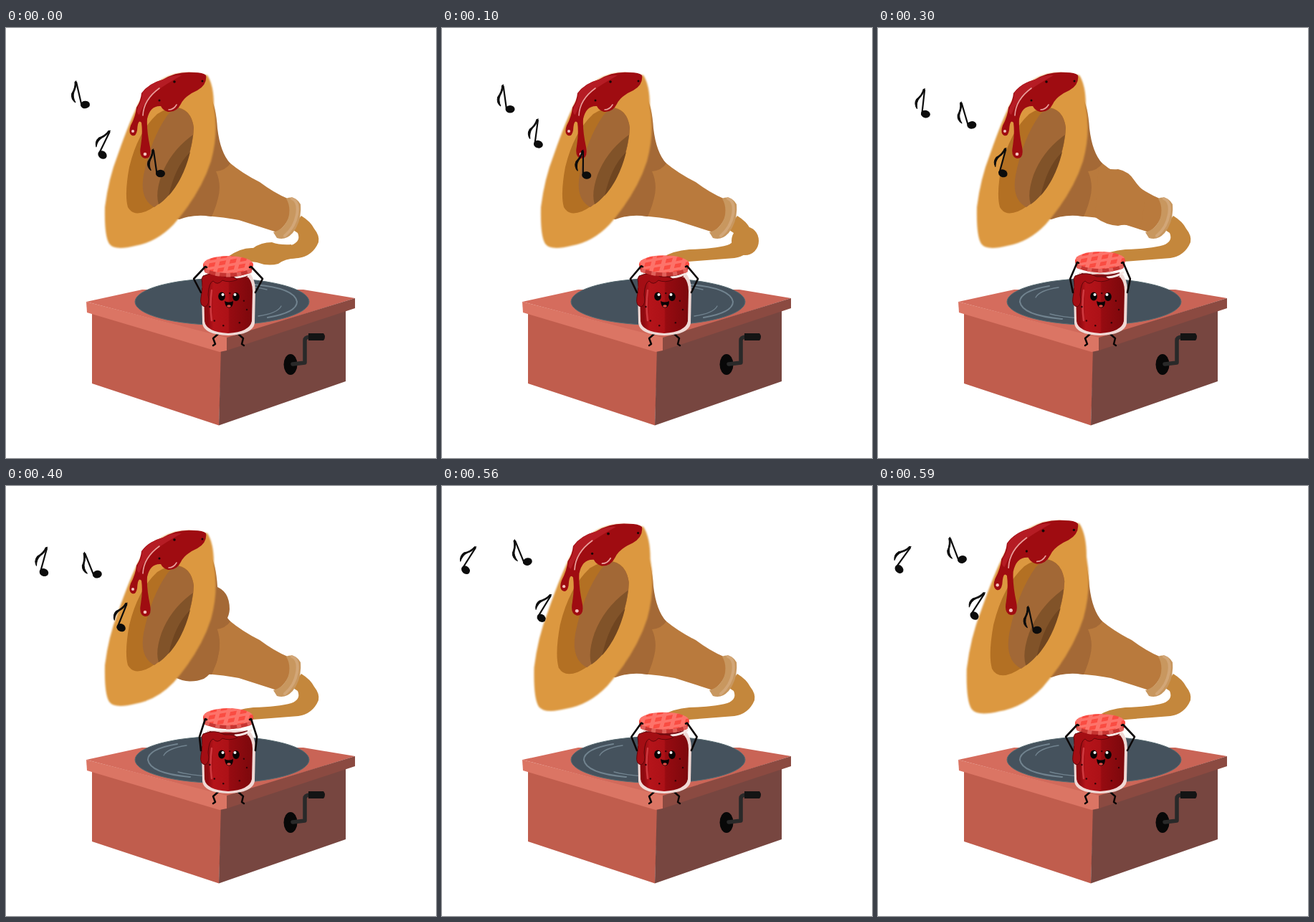
An HTML page for the animation above (690 ms loop, 600 by 600 pixels).

```html
<!DOCTYPE html>
<html lang="en">
<head>
<meta charset="utf-8">
<title>Jam gramophone</title>
<style>
  html, body { margin: 0; width: 100%; height: 100%; overflow: hidden; background: #fff; }
  svg { display: block; width: 100%; height: 100%; }
  .line { fill: none; stroke-linecap: round; stroke-linejoin: round; }
  .ink { stroke: #0b0606; }
  .shine { stroke: #e9a09c; }
</style>
</head>
<body>
<svg viewBox="0 0 600 600">
  <defs>
    <linearGradient id="topShade"><stop offset=".2" stop-color="#d56c5d"/><stop offset=".8" stop-color="#c96456"/></linearGradient>
    <linearGradient id="jarShade">
      <stop offset=".08" stop-color="#8f0a10"/><stop offset=".2" stop-color="#b5141a"/>
      <stop offset=".5" stop-color="#ad1117"/><stop offset=".53" stop-color="#970b11"/><stop offset="1" stop-color="#7c080c"/>
    </linearGradient>
    <filter id="soft"><feGaussianBlur stdDeviation="1"/></filter>
    <pattern id="gingham" width="15" height="9" patternUnits="userSpaceOnUse" patternTransform="rotate(-10) skewX(-25)">
      <path d="M0 0H15V9H0Z" fill="#fa4c42"/>
      <path d="M0 0H6V9H0ZM0 0H15V3.500H0Z" fill="#ff9a91" fill-opacity=".5"/>
    </pattern>
    <g id="note">
      <ellipse rx="6.500" ry="5.300" transform="rotate(8)"/>
      <path class="line" d="M-5 0V-33" stroke="#0c0c0c" stroke-width="2.200"/>
      <path d="M-5-35Q-6-27-11-21Q-15-15-12.500-6Q-18-12-15-19Q-8-26-7-34Z" stroke="#0c0c0c"/>
    </g>
  </defs>

  <!-- cabinet -->
  <path d="M120 394V496L297 554.500L301 445Z" fill="#c05d4d"/>
  <path d="M300 445L474 385V493L297 554.500Z" fill="#774640"/>
  <path d="M112 382L190 365H415L487 377L308 433Z" fill="url(#topShade)"/>
  <path d="M112 382L308 432V450L298 452L113 397Z" fill="#db7564"/>
  <path d="M308 432L487 377V391L308 450Z" fill="#8b4a41"/>
  <ellipse cx="301.500" cy="382" rx="121.500" ry="32.500" fill="#45525d" stroke="#566a70"/>
  <g id="grooves" class="line" stroke="#71838f">
    <path d="M239 360Q198 367 198 382Q201 401 257 406" stroke-width="2"/>
    <path d="M252 362Q225 366 220 376M240 399Q255 403 282 405" stroke-width="1.300"/>
  </g>
  <ellipse cx="397" cy="469.500" rx="9.500" ry="14.500" fill="#080808"/>
  <path class="line" d="M400 469L417 467V436Q417 431 425 431H440" stroke="#292929" stroke-width="5.500"/>
  <path d="M422 426H443Q447 431 443 436H422Z" fill="#141414"/>

  <!-- pipe and horn, with the swelling that travels along them -->
  <g fill="#c4873c">
    <path d="M308 320Q322 311 345 309Q380 308 398 303Q412 298 407 286L398 280L412 262Q425 270 430 280Q438 290 436 299Q428 318 408 321Q370 324 330 327Z"/>
    <path data-at="0" d="M310 319Q328 306 345 307Q356 299 371 299Q382 303 398 302L405 321Q389 322 380 329Q365 333 350 327Q330 324 312 328Z"/>
    <ellipse data-at="100" cx="423" cy="297" rx="19" ry="20"/>
  </g>
  <g fill="#b97a3d">
    <path d="M290 178L312 188Q330 203 354 215Q374 230 393 238Q405 265 378 285Q350 276 325 268Q305 264 278 262Z"/>
    <path data-at="200" d="M345 212Q358 223 376 222Q389 223 392 240L378 285Q360 292 350 281Q345 277 343 271Z"/>
    <path data-at="300" d="M308 190Q322 199 335 197Q350 200 358 213Q364 222 374 230L366 281Q350 272 335 276Q318 275 303 264Z"/>
  </g>
  <path d="M391 238Q403 233 411 246Q413 270 400 286Q390 297 378 293L373 285Q388 281 394 265Q398 250 391 238Z" fill="#c8975f"/>
  <path class="line" d="M399 238Q409 242 406 260Q403 278 389 290" stroke="#d2a677" stroke-width="4"/>
  <g fill="#a46936">
    <path d="M285 95Q293 110 295 140Q299 174 313 189Q306 199 293 200Q301 218 296 237Q293 250 287 263Q263 259 242 267L205 260Z"/>
    <path data-at="400" d="M292 140Q312 146 312 172Q311 190 294 198Q301 215 296 237Q293 258 276 269Q255 277 236 267Z"/>
  </g>

  <g id="bell">
    <path d="M281 66Q290 80 290 108Q297 146 286 186Q272 230 234 274Q210 299 180 304Q151 311 144 301Q137 290 138 250Q143 210 156 177Q174 125 188 100Q218 58 262 63Z" fill="#dc983f" filter="url(#soft)"/>
    <path d="M240 111Q259 115 262 139Q261 171 242 212Q220 245 195 256Q177 263 170 250Q165 232 172 194Q184 145 211 120Q226 110 240 111Z" fill="#b37023"/>
    <path d="M242 112Q259 116 262 139Q261 171 242 212Q229 236 207 250Q186 239 192 205Q202 155 225 122Q233 112 242 112Z" fill="#a26836"/>
    <path d="M261 149Q230 171 217 205Q208 231 213 246Q227 237 242 212Q257 181 261 149Z" fill="#815329"/>
    <path d="M257 173Q236 193 227 234Q248 210 257 173Z" fill="#6f4520"/>
    <path d="M279 66Q281 79 267 87Q249 95 244 106Q238 118 226 117Q219 115 216 109Q201 108 197 127Q196 143 201 166Q204 182 194 182Q185 180 188 165Q191 147 189 132Q184 126 183 143Q181 152 176 150Q170 147 174 136Q181 123 182 111Q188 102 189 91Q199 77 219 72Q238 60 262 62Q275 62 279 66Z" fill="#9f0c11"/>
    <path d="M245 66Q222 79 210 88Q194 100 186 121Q181 119 184 110Q190 102 190 91Q200 77 219 72Q232 65 245 66Z" fill="#b51c24"/>
    <path class="line shine" d="M191 122Q192 100 214 84M227 114Q234 114 238 107" stroke-width="1.600"/>
    <g fill="#f3c2bd"><circle cx="177" cy="144" r="2"/><circle cx="194" cy="176" r="2.300"/></g>
    <g fill="#190606"><circle cx="235" cy="75" r="1.800"/><circle cx="274" cy="74" r="1.500"/><circle cx="214" cy="101" r="1.500"/></g>
  </g>

  <!-- jar -->
  <path class="line ink" d="M296 427L289 433L292 441L289 443M324 427L331 433L329 441L332 443" stroke-width="2.500"/>
  <path d="M281 341H339Q348 350 348 366L347 412Q344 428 310 429Q276 428 274 412L273 366Q273 350 281 341Z" fill="#f0d9d5"/>
  <path d="M281 346Q311 340 338 348Q344 355 344 367L343 409Q340 424 310 426Q279 424 277 409L276 365Z" fill="url(#jarShade)"/>
  <path d="M284 342Q310 348 337 341V347Q310 354 283 348Z" fill="#7b1015"/>
  <path class="line" d="M320 348Q334 347 342 341" stroke="#f8e8e5" stroke-width="3"/>
  <path class="line" d="M287 366Q284 387 287 408" stroke="#cf3a40" stroke-width="2.500"/>
  <path d="M275 346Q291 339 305 347Q318 346 323 351Q311 356 302 352Q295 360 289 353Q283 355 282 372Q285 386 278 389Q270 388 272 376Q275 360 273 350Z" fill="#a40e14" stroke="#62060a"/>
  <g id="seeds" fill="#300407"></g>
  <g fill="#080405"><ellipse cx="301" cy="374.500" rx="4.800" ry="6"/><ellipse cx="321" cy="375" rx="4.800" ry="6"/><path d="M305 381Q311 384 317 381Q317 390 311 390.500Q306 390 305 381Z"/></g>
  <g fill="#fff"><circle cx="302.500" cy="372" r="2"/><circle cx="319.500" cy="372" r="2"/></g>
  <ellipse cx="311" cy="388" rx="2.800" ry="1.800" fill="#e24c45"/>
  <g id="lid">
    <path d="M275 329Q275 337 278 341Q307 353 341 342Q345 336 345 329Z" fill="#c73532"/>
    <path d="M278 338Q310 351 342 338" class="line" stroke="#e0605a" stroke-width="6" stroke-dasharray="6 9" style="stroke-linecap: butt"/>
    <ellipse cx="310" cy="330" rx="35" ry="12" fill="url(#gingham)"/>
  </g>
  <path id="arms" class="line ink" stroke-width="2.600"/>

  <g id="notes" fill="#0c0c0c"></g>
</svg>
<script>
  const LOOP = 690, LAST = 590, SWELL = 500;

  // Three legs of the notes' flight: [x, y, tilt] at the start, middle and end.
  const legs = [
    [[215.5, 203, -8], [175, 203, 15], [134.5, 181, 33]],
    [[134.5, 177, 26], [131, 136, -16], [117.5, 102.5, -21]],
    [[110.5, 107, -13], [67, 120, 6], [29.5, 116, 36]]
  ];

  const byId = id => document.getElementById(id);
  const move = (node, value) => node.setAttribute("transform", value);
  const show = (node, visible) => node.style.display = visible ? "" : "none";
  const bulges = document.querySelectorAll("[data-at]");

  function add(parent, tag, attributes) {
    const node = document.createElementNS("http://www.w3.org/2000/svg", tag);
    for (const name in attributes) node.setAttribute(name, attributes[name]);
    return byId(parent).appendChild(node);
  }

  for (let i = 0; i < 7; i++) {
    const angle = i * 2.4;
    add("seeds", "circle", { cx: 310 + 26 * Math.cos(angle), cy: 393 + 23 * Math.sin(angle), r: 1.2 });
  }

  // Each note flies its own leg; a newcomer enters the first one as the loop ends.
  const notes = [...legs, legs[0]].map((leg, i) => ({
    leg, delay: i < legs.length ? 0 : 1.08, node: add("notes", "use", { href: "#note" })
  }));

  // Parabola through three poses, p = 0 to 1.
  const along = ([a, b, c], p) => a.map((start, k) =>
    start + p * (4 * b[k] - 3 * start - c[k]) + 2 * p * p * (start + c[k] - 2 * b[k]));

  // The pose is held for 100 ms at first, then for 30 ms while the bell swells.
  function heldTime(time) {
    const hold = time < SWELL ? 100 : 30;
    const from = time < SWELL ? 0 : SWELL;
    return Math.min(LAST, from + Math.floor((time - from) / hold) * hold);
  }

  function draw(time) {
    const progress = time / LAST;
    for (const bulge of bulges) show(bulge, +bulge.dataset.at === time);

    for (const { leg, delay, node } of notes) {
      const p = progress - delay;
      const [x, y, tilt] = along(leg, p);
      show(node, p > -.1);
      move(node, `translate(${x} ${y}) rotate(${tilt})`);
    }

    const stretch = Math.sin(Math.PI * progress ** 1.9);
    const lift = 8 * stretch, out = 9 - 8 * stretch;
    move(byId("lid"), `translate(0 ${-lift})`);
    byId("arms").setAttribute("d",
      `M272 369L${271 - out} 350L278 ${333 - lift}l2 1M348 369L${349 + out} 350L342 ${333 - lift}l-2 1`);

    const size = 1 + .1 * Math.max(0, time - SWELL) / (LAST - SWELL);
    move(byId("bell"), `translate(280 201) scale(${size}) translate(-280 -201)`);
    move(byId("grooves"), time < 300 ? "rotate(180 302 382)" : "");
  }

  let shown = -1;
  function tick() {
    const time = heldTime(performance.now() % LOOP);
    if (time !== shown) draw(shown = time);
    requestAnimationFrame(tick);
  }
  tick();
</script>
</body>
</html>
```
